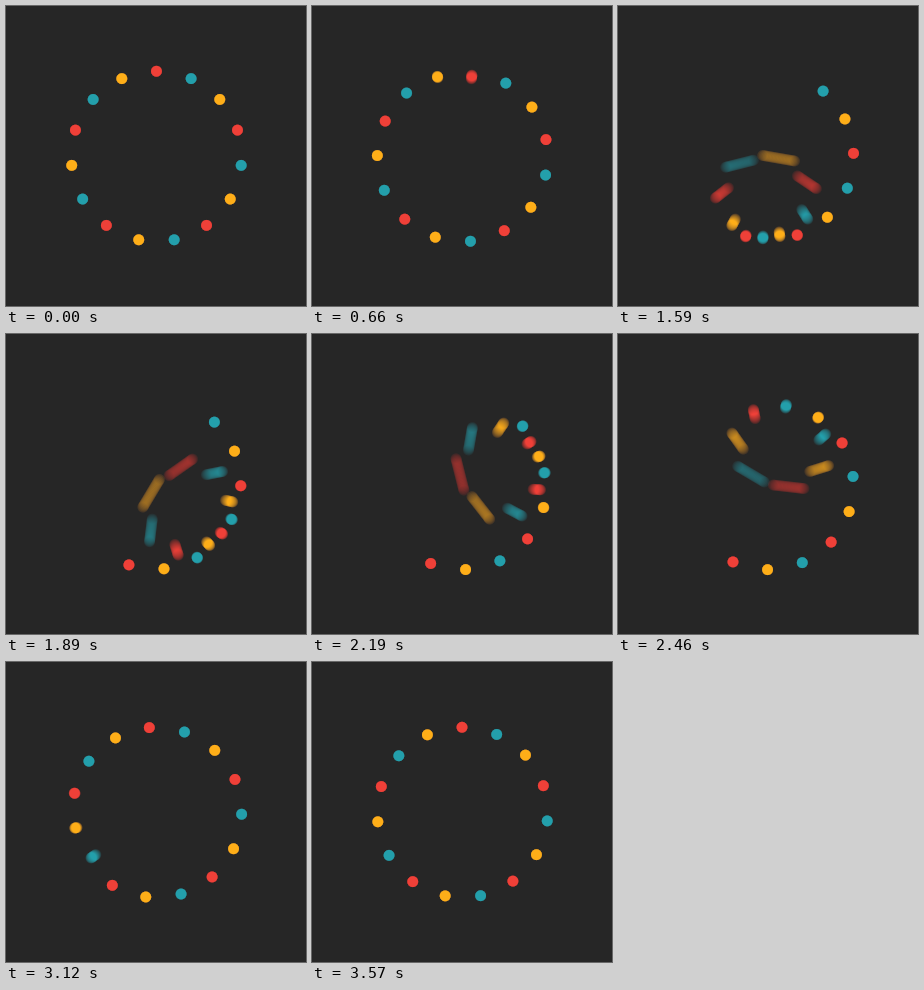
Animation of 300x300 px, one loop 3.6 s. Source, as an HTML page with a canvas:

```html
<!DOCTYPE html>
<html lang="en">
<head>
<meta charset="utf-8">
<title>Crossing dots</title>
<style>
html, body { margin: 0; width: 100%; height: 100%; overflow: hidden; background: #262626; }
canvas { display: block; }
</style>
</head>
<body>
<canvas id="stage" width="300" height="300"></canvas>
<script>
const SIZE = 300, CENTER = 150.45, RING = 85.2, DOT = 5.4;
const LOOP = 3600, STEP = 30;
const COUNT = 15, TURN = 36;
const DELAY = 120, FIRST_CROSSING = 1080, STEEPNESS = 0.0084;
const SHUTTER = 96, SAMPLES = 24;
const GAMMA = 2.2;

const toLinear = rgb => rgb.map(v => (v / 255) ** GAMMA);
const background = [38, 38, 38];
const backLinear = toLinear(background);
const palette = [[239, 64, 56], [35, 159, 171], [254, 174, 24]].map(toLinear);

const ctx = document.getElementById('stage').getContext('2d');
const image = ctx.createImageData(SIZE, SIZE);
const coverage = new Float32Array(SIZE * SIZE * palette.length);

// Signed distance from the centre: +RING before crossing, -RING after.
function reach(time, order) {
  const elapsed = time - FIRST_CROSSING - order * DELAY;
  return RING * (1 - 2 / (1 + Math.exp(-STEEPNESS * elapsed)));
}

function addDisc(x, y, hue, weight) {
  const r = DOT + 1;
  for (let py = Math.floor(y - r); py <= y + r; py++) {
    for (let px = Math.floor(x - r); px <= x + r; px++) {
      const edge = DOT + 0.5 - Math.hypot(px + 0.5 - x, py + 0.5 - y);
      if (edge > 0) {
        coverage[(py * SIZE + px) * palette.length + hue] += weight * Math.min(1, edge);
      }
    }
  }
}

function addDot(index, time) {
  const angle = (index * 360 / COUNT + TURN * time / LOOP) * Math.PI / 180;
  const order = (COUNT - index) % COUNT;
  for (let i = 0; i < SAMPLES; i++) {
    const moment = time + SHUTTER * ((i + 0.5) / SAMPLES - 0.5);
    const r = reach(moment, order);
    addDisc(CENTER + r * Math.sin(angle), CENTER - r * Math.cos(angle),
      index % palette.length, 1 / SAMPLES);
  }
}

// Blend in linear light so that blurred streaks keep their brightness.
function resolve() {
  const data = image.data;
  for (let p = 0; p < SIZE * SIZE; p++) {
    const weights = p * palette.length;
    const a = coverage[weights], b = coverage[weights + 1], c = coverage[weights + 2];
    const total = a + b + c;
    for (let ch = 0; ch < 3; ch++) {
      let value = background[ch];
      if (total > 0) {
        const scale = 1 / Math.max(1, total);
        const light = (a * palette[0][ch] + b * palette[1][ch] + c * palette[2][ch]) * scale
          + Math.max(0, 1 - total) * backLinear[ch];
        value = 255 * light ** (1 / GAMMA);
      }
      data[p * 4 + ch] = value;
    }
    data[p * 4 + 3] = 255;
  }
}

function draw(time) {
  coverage.fill(0);
  for (let i = 0; i < COUNT; i++) addDot(i, time);
  resolve();
  ctx.putImageData(image, 0, 0);
}

const start = performance.now();
let shown = -1;
function tick() {
  const elapsed = Math.max(0, performance.now() - start) % LOOP;
  const time = Math.floor(elapsed / STEP) * STEP;
  if (time !== shown) draw(shown = time);
  requestAnimationFrame(tick);
}
tick();
</script>
</body>
</html>
```
